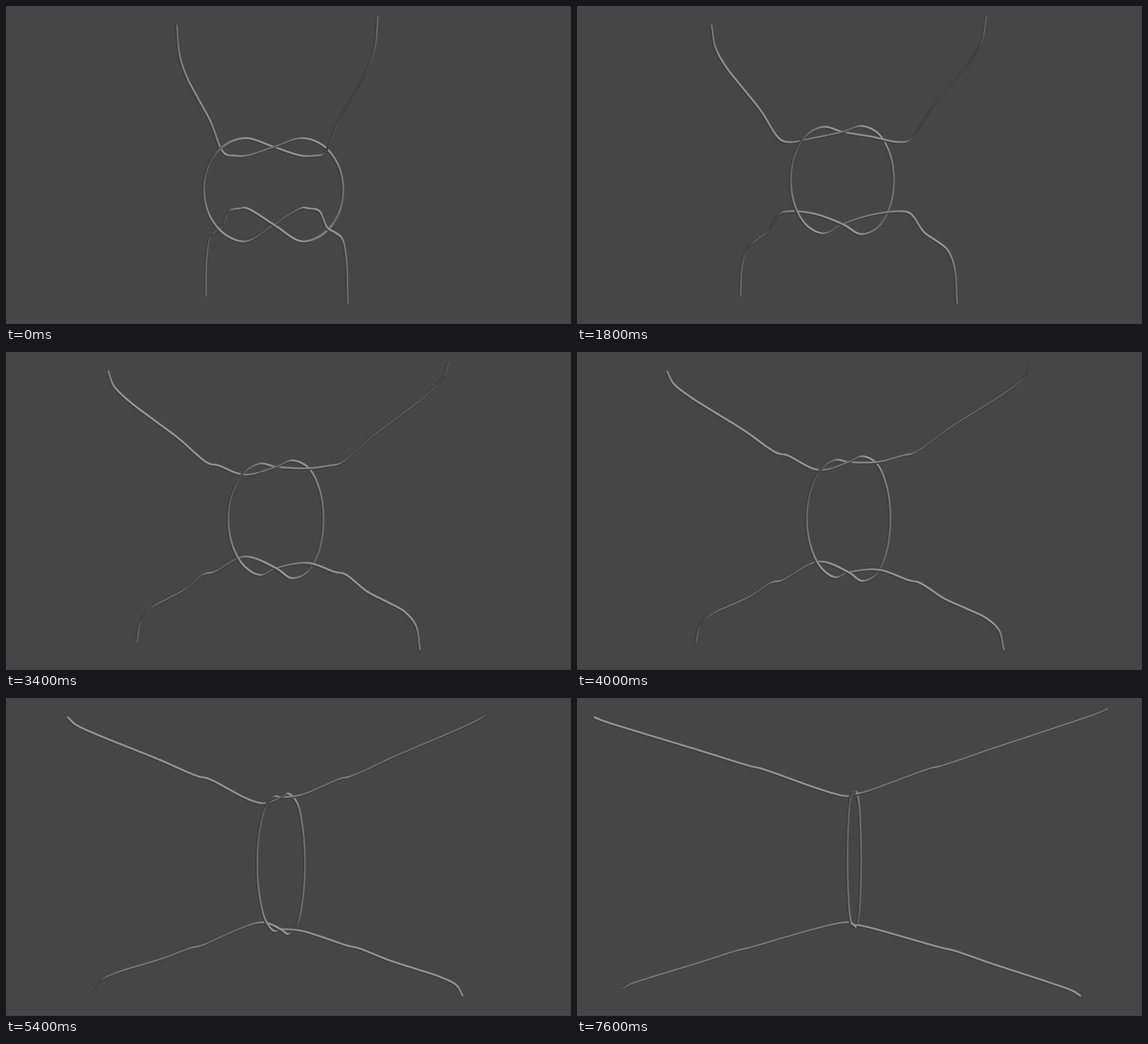
An HTML page with a canvas for the animation above (8000 ms loop, 998 px wide and 561 px high).

```html
<!DOCTYPE html>
<html lang="en">
<head>
<meta charset="utf-8">
<title>Two ropes tightening</title>
<style>
  html, body { margin: 0; width: 100%; height: 100%; overflow: hidden; background: #464646; }
  canvas { display: block; }
</style>
</head>
<body>
<canvas id="stage" width="998" height="561"></canvas>
<script>
const ctx = document.getElementById('stage').getContext('2d');
const STEP = 200, LAST = 38, LOOP = 8000, SUB = 8;
const LIGHT = 57 * Math.PI / 180;
const KINK_AXIS = 474, WIDEST = 123;

// How the knot closes, at a few steps of the pull.
const keySteps = [0, 9, 17, 27, LAST];
const loopCentre = [473, 469, 477, 486, 490];
const loopHalf = [WIDEST, 91, 84, 42, 12];
const topKink = { reach: [70, 96, 99, 117, 150], y: [264, 240, 200, 142, 124] };
const bottomKink = { reach: [61, 97, 107, 130, 172], y: [357, 362, 388, 437, 441] };

// Free ends slide outwards at constant speed.
const ropes = {
  right: { side: 1, top: { x: 302, pull: -271, y: 34 }, bottom: { x: 353, pull: -271, y: 512 } },
  left: { side: -1, top: { x: 657, pull: 280, y: 19 }, bottom: { x: 604, pull: 285, y: 525 } }
};

const smooth = p => p * p * p * (10 - 15 * p + 6 * p * p);

function slope(xs, ys, i) {
  const chord = j => (ys[j + 1] - ys[j]) / (xs[j + 1] - xs[j]);
  if (i === 0) return chord(0);
  if (i === xs.length - 1) return chord(i - 1);
  const before = xs[i] - xs[i - 1], after = xs[i + 1] - xs[i];
  return (chord(i - 1) * after + chord(i) * before) / (before + after);
}

// Cubic Hermite curve on segment i at u in 0..1.
function curve(xs, ys, i, u) {
  const h = xs[i + 1] - xs[i], v = 1 - u;
  return ys[i] * v * v * (1 + 2 * u) + ys[i + 1] * u * u * (3 - 2 * u)
    + h * u * v * (v * slope(xs, ys, i) - u * slope(xs, ys, i + 1));
}

function track(keys, step) {
  let i = 0;
  while (i < keys.length - 2 && step >= keySteps[i + 1]) i++;
  return curve(keySteps, keys, i, (step - keySteps[i]) / (keySteps[i + 1] - keySteps[i]));
}

// Arm from a free end to its kink: leaves the end upright, then straightens.
function arm(end, kink, side, bow, p, step) {
  const x = end.x + end.pull * p, y = end.y;
  const inner = { x: KINK_AXIS - side * track(kink.reach, step), y: track(kink.y, step) };
  const outer = { x: inner.x - side * 18, y: inner.y - 4 * Math.sign(inner.y - y) };
  const dx = outer.x - x, dy = outer.y - y, h = dy * bow * (1 - 0.9 * p);
  const points = [];
  for (let n = 0; n <= 5; n++) {
    const t = n / 5, v = 1 - t, along = 1.5 * t * t * v + t * t * t;
    points.push({ x: x + dx * along, y: y + dy * along + 3 * t * v * v * h });
  }
  return [...points, inner];
}

function controlPoints({ side, top, bottom }, step) {
  const p = step / LAST;
  const centre = track(loopCentre, step), half = track(loopHalf, step);
  const high = 233 - 67 * Math.min(1, 1.3 * p);
  const low = 405 + 10 * Math.cos(2 * Math.PI * p / 0.78);
  const tilt = 0.25 * smooth(p);
  const bulge = 0.4 - 0.15 * p, dip = 0.4 + 0.6 * p;
  const tightness = (half / WIDEST) ** 2;
  // level runs from 1 at the top of the loop to -1 at the bottom.
  const place = (reach, level, depth = 0) => {
    const dx = side * reach * half;
    return {
      x: centre + dx,
      y: (high + low) / 2 - level * ((low - high) / 2 - depth + tilt * dx)
    };
  };
  const twist = (level, amount) => {
    const depth = 4 + amount * tightness;
    return [place(-dip, level, depth), place(0, level, depth / 2)];
  };
  const loop = [];
  for (let n = 0; n <= 6; n++) {
    const angle = n * Math.PI / 6;
    loop.push(place(bulge + (1 - bulge) * Math.sin(angle), Math.cos(angle)));
  }
  return [
    ...arm(top, topKink, side, 0.45, p, step), ...twist(1, 27), ...loop,
    ...twist(-1, 55).reverse(), ...arm(bottom, bottomKink, side, 1.15, p, step).reverse()
  ];
}

function ropeAt(rope, step) {
  const control = controlPoints(rope, step);
  const xs = control.map(c => c.x), ys = control.map(c => c.y);
  const knots = [0];
  for (let i = 1; i < xs.length; i++)
    knots.push(knots[i - 1] + Math.sqrt(Math.hypot(xs[i] - xs[i - 1], ys[i] - ys[i - 1])) + 0.01);
  const points = [];
  for (let n = 0; n <= (xs.length - 1) * SUB; n++) {
    const i = Math.min(Math.floor(n / SUB), xs.length - 2), u = n / SUB - i;
    points.push({ x: curve(knots, xs, i, u), y: curve(knots, ys, i, u), at: n / SUB });
  }
  return points;
}

function drawRope(points, swell, from = 0, to = Infinity) {
  const part = points.filter(q => q.at >= from && q.at <= to);
  ctx.lineJoin = 'round';
  ctx.lineCap = 'butt';
  ctx.strokeStyle = '#3e3e3e';
  ctx.lineWidth = 4.8;
  ctx.beginPath();
  part.forEach(q => ctx.lineTo(q.x - 1.6, q.y + 1.2));
  ctx.stroke();

  // The lit edge fades where the rope runs along the light.
  ctx.lineCap = 'round';
  for (let i = 1; i < part.length; i++) {
    const a = part[i - 1], b = part[i];
    const lit = Math.abs(Math.sin(Math.atan2(a.y - b.y, b.x - a.x) - LIGHT));
    const extra = swell.size * Math.exp(-((b.at - swell.at) ** 2));
    const grey = Math.round(Math.min(150, 63 + 86 * lit + 42 * extra));
    ctx.strokeStyle = `rgb(${grey},${grey},${grey})`;
    ctx.lineWidth = 1.7 + 1.5 * lit + 2.6 * extra;
    ctx.beginPath();
    ctx.moveTo(a.x, a.y);
    ctx.lineTo(b.x, b.y);
    ctx.stroke();
  }
}

function draw(step) {
  ctx.fillStyle = '#464646';
  ctx.fillRect(0, 0, 998, 561);
  ctx.fillStyle = '#3c3c3c';
  ctx.fillRect(0, 560, 998, 1);
  ctx.fillRect(997, 0, 1, 561);

  const slack = Math.max(0, 1 - step / 36);
  const right = ropeAt(ropes.right, step), left = ropeAt(ropes.left, step);
  const rightSwell = { at: 13.5, size: slack }, leftSwell = { at: 10.3, size: slack * 0.6 };
  drawRope(right, rightSwell);
  drawRope(left, leftSwell);
  // The first rope passes over at both middle crossings.
  drawRope(right, rightSwell, 7.5, 8.8);
  drawRope(right, rightSwell, 15.4, 16.6);
}

const start = performance.now();
let shown = -1;
function tick() {
  const time = (performance.now() - start) % LOOP;
  const step = Math.min(LAST, Math.floor(time / STEP));
  if (step !== shown) draw(shown = step);
  requestAnimationFrame(tick);
}
tick();
</script>
</body>
</html>
```
